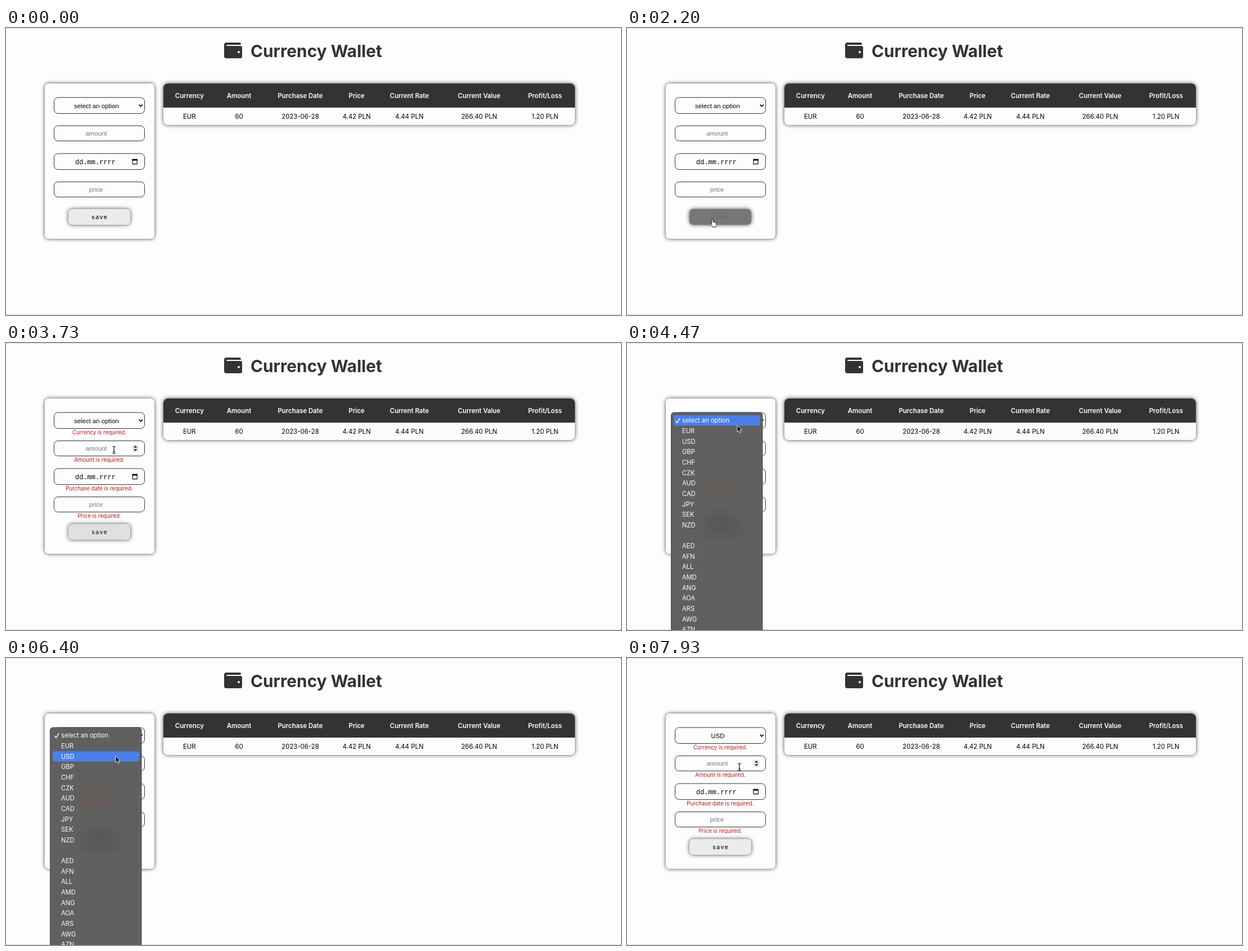
Animation, 1094 px wide and 512 px high, one loop 8000 ms. Source, as an HTML page:

```html
<!DOCTYPE html>
<html lang="en">
<head>
<meta charset="utf-8">
<title>Currency Wallet</title>
<style>
html, body { margin: 0; width: 100%; height: 100%; overflow: hidden; background: #fdfdfd; }
body { position: relative; font: 11.4px Inter, sans-serif; font-optical-sizing: none; }
svg { position: absolute; left: 0; top: 0; }
.box { position: absolute; box-sizing: border-box; background: #fdfdfd; box-shadow: 0 0 7px rgba(0,0,0,.72); }
.rule { position: absolute; left: 0; width: 100%; height: 1px; background: #dcdcdc; }
#form { left: 69px; top: 99px; width: 194.5px; height: 276.5px; border-radius: 7px; }
#table { left: 279.5px; top: 99px; width: 732.5px; height: 73.5px; border-radius: 8px; overflow: hidden; }
#head { height: 43px; background: #333; }
#button { left: 111px; top: 322.5px; width: 110px; height: 28.5px; border-radius: 7px; background: #ebebeb; }
.mid { text-anchor: middle; }
.title { font-size: 29.8px; font-weight: 700; fill: #333; }
.th { font-weight: 600; fill: #fff; }
.field { fill: none; stroke: #333; }
.arial { font-family: "Liberation Sans", Arial, sans-serif; font-size: 11.4px; }
.hint { fill: #757575; }
.mono { font-family: "Liberation Mono", "Courier New", monospace; font-size: 12px; }
.save { font-size: 10.3px; font-weight: 500; letter-spacing: 1.5px; fill: #111; }
.error { font-size: 9.68px; fill: #c0161c; }
.item { font-size: 11.2px; fill: #fff; }

.anim { animation: 8s linear infinite; }
.hard { animation: 8s step-end infinite; }
#button { animation-name: button; }
.save { animation-name: label; }
#errors { animation-name: errors; }
#menu { animation-name: menu; }
#mark { animation-name: mark; }
#cursor { animation-name: move; }
#arrow { animation-name: arrow; }
#hand { animation-name: hand; }
.typing { animation-name: typing; }
#empty { animation-name: empty; }
#chosen { animation-name: chosen; }

@keyframes button {
  0%, 26.125% { background: #ebebeb; }
  27.5% { background: #777; }
  29.875% { background: #333; }
  37.5%, 40.875% { box-shadow: 0 0 7px rgba(0,0,0,.72); }
  39% { box-shadow: 0 0 3px rgba(0,0,0,.72); }
  44% { background: #333; animation-timing-function: ease; }
  47.75%, 100% { background: #ebebeb; }
}
@keyframes label {
  0%, 26.125% { fill: #111; }
  27.5% { fill: #696969; }
  29.875% { fill: #fdfdfd; }
  44% { fill: #fdfdfd; animation-timing-function: ease; }
  47.75%, 100% { fill: #111; }
}
@keyframes errors { 0% { opacity: 0; } 38.3%, 100% { opacity: 1; } }
@keyframes menu {
  0%, 55.87% { opacity: 0; }
  55.875%, 80.375% { opacity: 1; }
  81.625% { opacity: .39; }
  82.5%, 100% { opacity: 0; }
}
/* one row is 18.65px */
@keyframes mark {
  0% { transform: translateY(0); }
  59.125% { transform: translateY(18.65px); }
  60.75% { transform: translateY(37.3px); }
  62% { transform: translateY(55.95px); }
  66.625% { transform: translateY(37.3px); }
  67.875% { transform: translateY(18.65px); }
  73.375% { transform: translateY(37.3px); opacity: 1; }
  78.375% { transform: translateY(37.3px); opacity: 0; }
  79.25%, 100% { transform: translateY(37.3px); opacity: 1; }
}
@keyframes move {
  0%, 11.625% { transform: translate(980px, 505px); }
  14.125%, 16.625% { transform: translate(431px, 282px); }
  17.5%, 20% { transform: translate(362px, 325px); }
  25.75% { transform: translate(222px, 345px); }
  26.625% { transform: translate(162px, 342px); }
  27.5% { transform: translate(152px, 340.5px); }
  30%, 30.875% { transform: translate(159px, 348px); }
  32.5%, 44% { transform: translate(159px, 341px); }
  45% { transform: translate(167px, 318px); }
  46.625% { transform: translate(192px, 191px); }
  49.125% { transform: translate(196px, 152px); }
  54.125%, 55.875% { transform: translate(196px, 147px); }
  62.5% { transform: translate(200px, 195px); }
  65% { transform: translate(200px, 190px); }
  65.875% { transform: translate(200px, 181px); }
  68.75% { transform: translate(199px, 160px); }
  71.25% { transform: translate(199px, 158px); }
  75%, 82.5% { transform: translate(195px, 175px); }
  88.375%, 89.125% { transform: translate(196px, 184px); }
  92.5%, 95% { transform: translate(230px, 246px); }
  99.125%, 100% { transform: translate(200px, 194.5px); }
}
@keyframes arrow {
  0% { opacity: 0; }
  11.625% { opacity: 1; }
  25.75% { opacity: 0; }
  45% { opacity: 1; }
  46.3% { opacity: 0; }
  48.5% { opacity: 1; }
  83% { opacity: 0; }
  90.2% { opacity: 1; }
  98.5%, 100% { opacity: 0; }
}
@keyframes hand { 0% { opacity: 0; } 25.75% { opacity: 1; } 45%, 100% { opacity: 0; } }
@keyframes typing {
  0% { opacity: 0; }
  46.3% { opacity: 1; }
  48.5% { opacity: 0; }
  83% { opacity: 1; }
  90.2% { opacity: 0; }
  98.5%, 100% { opacity: 1; }
}
@keyframes empty { 0% { opacity: 1; } 82.5%, 100% { opacity: 0; } }
@keyframes chosen { 0% { opacity: 0; } 82.5%, 100% { opacity: 1; } }
</style>
</head>
<body>
<div class="rule" style="top:0"></div>
<div class="rule" style="top:511px"></div>
<div class="box" id="form"></div>
<div class="box" id="table"><div id="head"></div></div>
<div class="box anim" id="button"></div>

<svg width="1094" height="512" viewBox="0 0 1094 512">
  <defs>
    <radialGradient id="warm">
      <stop offset="0" stop-color="#6a5650" stop-opacity=".55"/>
      <stop offset="1" stop-color="#6a5650" stop-opacity="0"/>
    </radialGradient>
    <radialGradient id="dim">
      <stop offset=".3" stop-color="#555" stop-opacity=".7"/>
      <stop offset="1" stop-color="#555" stop-opacity="0"/>
    </radialGradient>
  </defs>

  <path fill="#333" fill-rule="evenodd" d="M417 32H393a1 1 0 0 1 0-2H417a1 1 0 0 0 1-1 3 3 0 0 0-3-3H392a4 4 0 0 0-4 4V50a4 4 0 0 0 4 4H416.8a3.2 3 0 0 0 3.2-3V35a3.2 3 0 0 0-3-3ZM414 45a2 2 0 1 1 0-4 2 2 0 0 1 0 4Z"/>
  <text class="title" x="435" y="52">Currency Wallet</text>
  <g id="cells" class="mid"></g>

  <g class="field">
    <rect x="85.5" y="124" width="161" height="28.5" rx="7"/>
    <rect x="85.5" y="174.5" width="161" height="27" rx="7"/>
    <rect x="85.5" y="224" width="161" height="28.5" rx="7"/>
    <rect x="85.5" y="274.5" width="161" height="27" rx="7"/>
  </g>
  <g class="mid arial">
    <text class="hard" id="empty" x="161" y="142.5">select an option</text>
    <text class="hard" id="chosen" x="161.5" y="142.5">USD</text>
    <text class="hint" x="160.5" y="192">amount</text>
    <text class="hint" x="160" y="292">price</text>
  </g>
  <path d="M236.8 136.6l3 3.2 3-3.2" fill="none" stroke="#000" stroke-width="1.6"/>
  <text class="mono" x="123" y="242.5">dd.mm.rrrr</text>
  <path d="M225 235h8.2v7.6H225Z" fill="none" stroke="#000" stroke-width="1.1"/>
  <path d="M224.5 234h9.2v2.6h-9.2ZM226 233h1.4v2H226ZM230.8 233h1.4v2h-1.4Z"/>
  <g class="hard typing">
    <rect x="224.5" y="181.5" width="11.5" height="13" rx="1" fill="#e9e9e9"/>
    <path d="M227 186.7l3.2-4 3.2 4ZM227 189.3l3.2 4 3.2-4Z" fill="#333"/>
  </g>
  <text class="mid save anim" x="166.7" y="340.6">save</text>
  <g id="errors" class="mid error hard"></g>

  <g id="menu" class="anim">
    <rect x="78.5" y="124" width="162.5" height="400" rx="5" fill="#606060" stroke="#4c4c4c"/>
    <ellipse cx="158" cy="252" rx="48" ry="28" fill="url(#warm)"/>
    <ellipse cx="168" cy="325" rx="50" ry="34" fill="url(#dim)"/>
    <rect id="mark" class="hard" x="83" y="129" width="154" height="18.6" rx="4" fill="#4a7fe8"/>
    <path d="M86.5 139l2.6 3.2 4.8-7.6" fill="none" stroke="#fff" stroke-width="1.4" stroke-linecap="round"/>
    <g id="items" class="item"></g>
  </g>

  <g id="cursor" class="anim">
    <path id="arrow" class="hard" d="M0 0V11.4L2.6 9 4.4 13.2 6.4 12.3 4.6 8.2H8.2Z" stroke="#fff" stroke-width=".9"/>
    <path id="hand" class="hard" transform="translate(-4 0)" fill="#fff" stroke="#000" stroke-width=".9" stroke-linejoin="round"
      d="M2.6 8.6V1.4Q2.8 .3 3.8 .4 4.8 .4 5 1.5V5.4Q6.6 4.6 7 6 8.6 5.4 9 6.8 10.8 6.4 11 8V10.5Q10.8 12.6 9.8 14.6H4.4Q3.4 12.4 .8 9.4 .2 8 1.2 7.6 2 7.6 2.6 8.6Z"/>
    <path class="hard typing" d="M-2.6-6.4Q-.3-6.4 0-5.2 .3-6.4 2.6-6.4M0-5.2V5.2M-2.6 6.4Q-.3 6.4 0 5.2 .3 6.4 2.6 6.4M-1.4 2.6H1.4" fill="none" stroke="#000" stroke-width="1.1"/>
  </g>
</svg>

<script>
const byId = id => document.getElementById(id);

function addText(parent, text, x, y, cls) {
  const el = document.createElementNS("http://www.w3.org/2000/svg", "text");
  el.setAttribute("x", x);
  el.setAttribute("y", y);
  if (cls) el.setAttribute("class", cls);
  el.textContent = text;
  byId(parent).append(el);
}

const columns = [
  [326.3, "Currency", "EUR"],
  [414.5, "Amount", "60"],
  [523.5, "Purchase Date", "2023-06-28"],
  [623.7, "Price", "4.42 PLN"],
  [717.5, "Current Rate", "4.44 PLN"],
  [841.7, "Current Value", "266.40 PLN"],
  [958.8, "Profit/Loss", "1.20 PLN"]
];
for (const [x, name, value] of columns) {
  addText("cells", name, x, 125.2, "th");
  addText("cells", value, x, 161.7);
}

const errors = [["Currency", 162.6], ["Amount", 211.6], ["Purchase date", 262.6], ["Price", 311.6]];
for (const [name, y] of errors) addText("errors", name + " is required.", 166, y);

const options = "select an option,EUR,USD,GBP,CHF,CZK,AUD,CAD,JPY,SEK,NZD,,AED,AFN,ALL,AMD,ANG,AOA,ARS,AWG,AZN";
options.split(",").forEach((name, i) => addText("items", name, 98, 142.3 + 18.65 * i));
</script>
</body>
</html>
```
